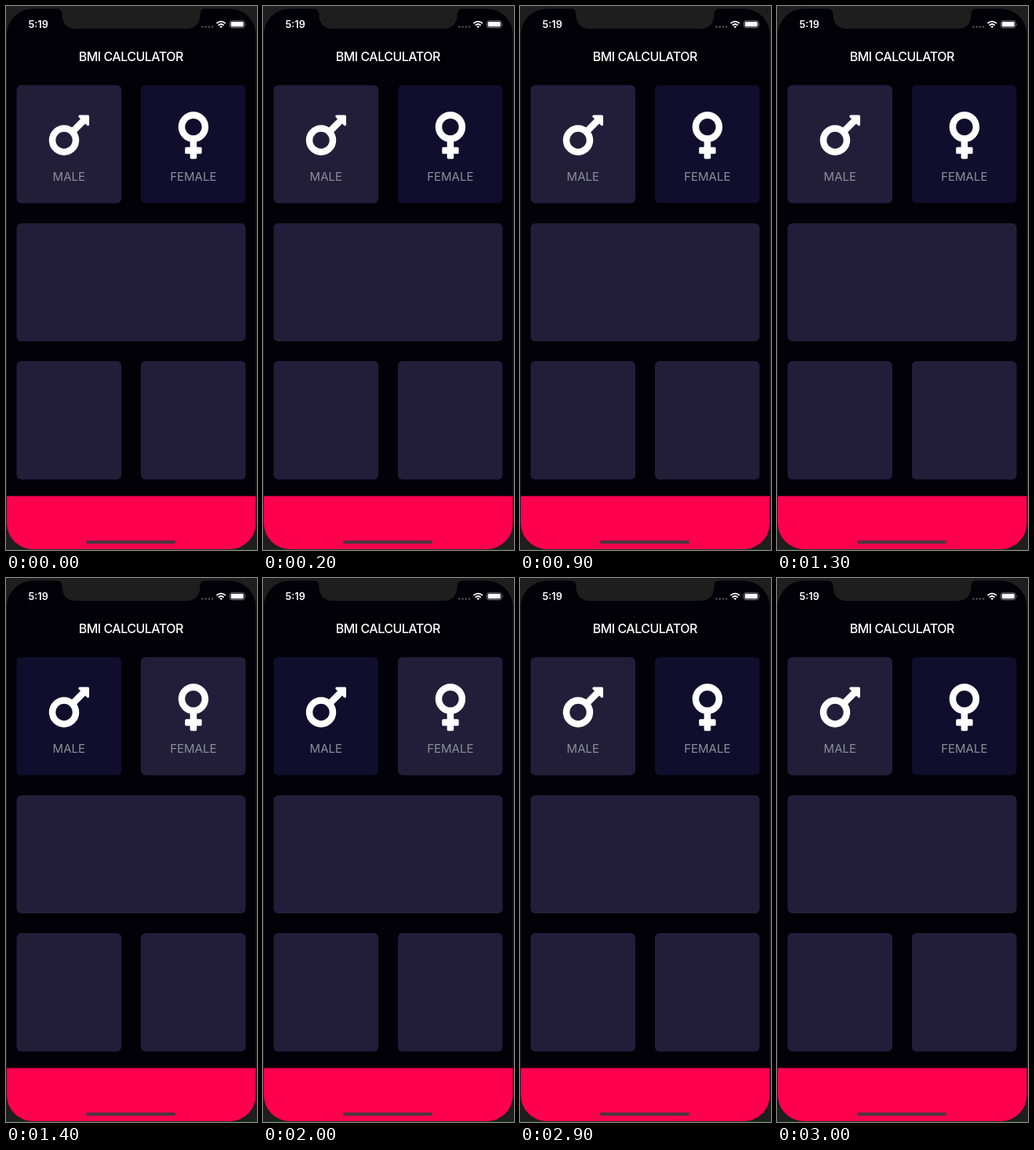
These frames come from a looping animation (320x691 px, 3.1 s). An HTML page:

```html
<!DOCTYPE html>
<html lang="en">
<head>
<meta charset="utf-8">
<title>BMI Calculator</title>
<style>
  html, body { margin: 0; height: 100%; overflow: hidden; background: #1e1e1e; }
  svg { display: block; width: 320px; height: 691px; font-family: Inter, sans-serif; }
  .card { fill: #221e3a; }
  .card.off { fill: #100e2c; }
  .label { fill: #8d8e98; font-size: 15px; text-anchor: middle; }
  .ring { fill: none; stroke: #fff; stroke-width: 64; }
</style>
</head>
<body>
<svg viewBox="0 0 320 691">
  <defs>
    <clipPath id="screen"><rect x="1" y="3.5" width="317.5" height="686.5" rx="33"/></clipPath>
  </defs>
  <rect y="690" width="320" height="1" fill="#123f12"/>

  <g clip-path="url(#screen)">
    <rect width="320" height="691" fill="#010107"/>
    <rect y="622.5" width="320" height="69" fill="#ff004f"/>
  </g>
  <path d="M63 3C69 3 71.500 6 71.500 11C71.500 22 78 29 89 29H230C241 29 247.500 22 247.500 11C247.500 6 250 3 256 3Z" fill="#1e1e1e"/>
  <rect x="102" y="679" width="114" height="4" rx="2" fill="#4d3541"/>

  <!-- status bar -->
  <text x="28.500" y="27.500" font-size="12.700" font-weight="600" fill="#fff">5:19</text>
  <g fill="#55555c">
    <circle cx="250.500" cy="26.500" r="1.200"/><circle cx="254.700" cy="26.500" r="1.200"/>
    <circle cx="258.900" cy="26.500" r="1.200"/><circle cx="263.100" cy="26.500" r="1.200"/>
  </g>
  <g fill="none" stroke="#fff" stroke-width="1.800">
    <path d="M268.500 22.200Q274.200 17 279.900 22.200M270.700 24.600Q274.200 21.400 277.700 24.600"/>
    <path d="M272.300 25.900Q274.200 24.400 276.100 25.900L274.200 27.900Z" fill="#fff" stroke="none"/>
  </g>
  <rect x="285.500" y="18.800" width="18.500" height="8.800" rx="2.500" fill="none" stroke="#85858c" stroke-width=".9"/>
  <rect x="286.800" y="20.100" width="15.900" height="6.200" rx="1.400" fill="#fff"/>
  <path d="M305 21.700q1.500 1.500 0 3z" fill="#85858c"/>

  <text x="159.300" y="70" font-size="16" font-weight="500" letter-spacing="-.5" text-anchor="middle" fill="#fff">BMI CALCULATOR</text>

  <rect id="male" class="card" x="13.500" y="100.500" width="133.500" height="150" rx="6"/>
  <rect id="female" class="card off" x="172" y="100.500" width="133.500" height="150" rx="6"/>
  <rect class="card" x="13.500" y="276" width="292" height="150" rx="6"/>
  <rect class="card" x="13.500" y="451" width="133.500" height="150.500" rx="6"/>
  <rect class="card" x="172" y="451" width="133.500" height="150.500" rx="6"/>

  <g transform="translate(54.800 129.900) scale(.1335)">
    <circle class="ring" cx="144" cy="304" r="112"/>
    <path class="ring" d="M230 218L340 108"/>
    <path d="M293 76H372V155Z" fill="#fff" stroke="#fff" stroke-width="24" stroke-linejoin="round"/>
  </g>
  <g transform="translate(219.700 130.100) scale(.1335)">
    <circle class="ring" cx="144" cy="176" r="112"/>
    <rect x="112" y="300" width="64" height="180" rx="12" fill="#fff"/>
    <rect x="64" y="368" width="160" height="64" rx="12" fill="#fff"/>
  </g>
  <text class="label" x="80.300" y="221.500">MALE</text>
  <text class="label" x="238.800" y="221.500">FEMALE</text>
</svg>
<script>
  const LOOP = 3100, FEMALE_TAP = 1400, MALE_TAP = 2900;
  const male = document.getElementById('male');
  const female = document.getElementById('female');
  const start = performance.now();

  function draw(now) {
    const t = Math.max(0, now - start) % LOOP;
    const femaleOn = t >= FEMALE_TAP && t < MALE_TAP;
    male.classList.toggle('off', femaleOn);
    female.classList.toggle('off', !femaleOn);
    requestAnimationFrame(draw);
  }
  draw(start);
</script>
</body>
</html>
```
